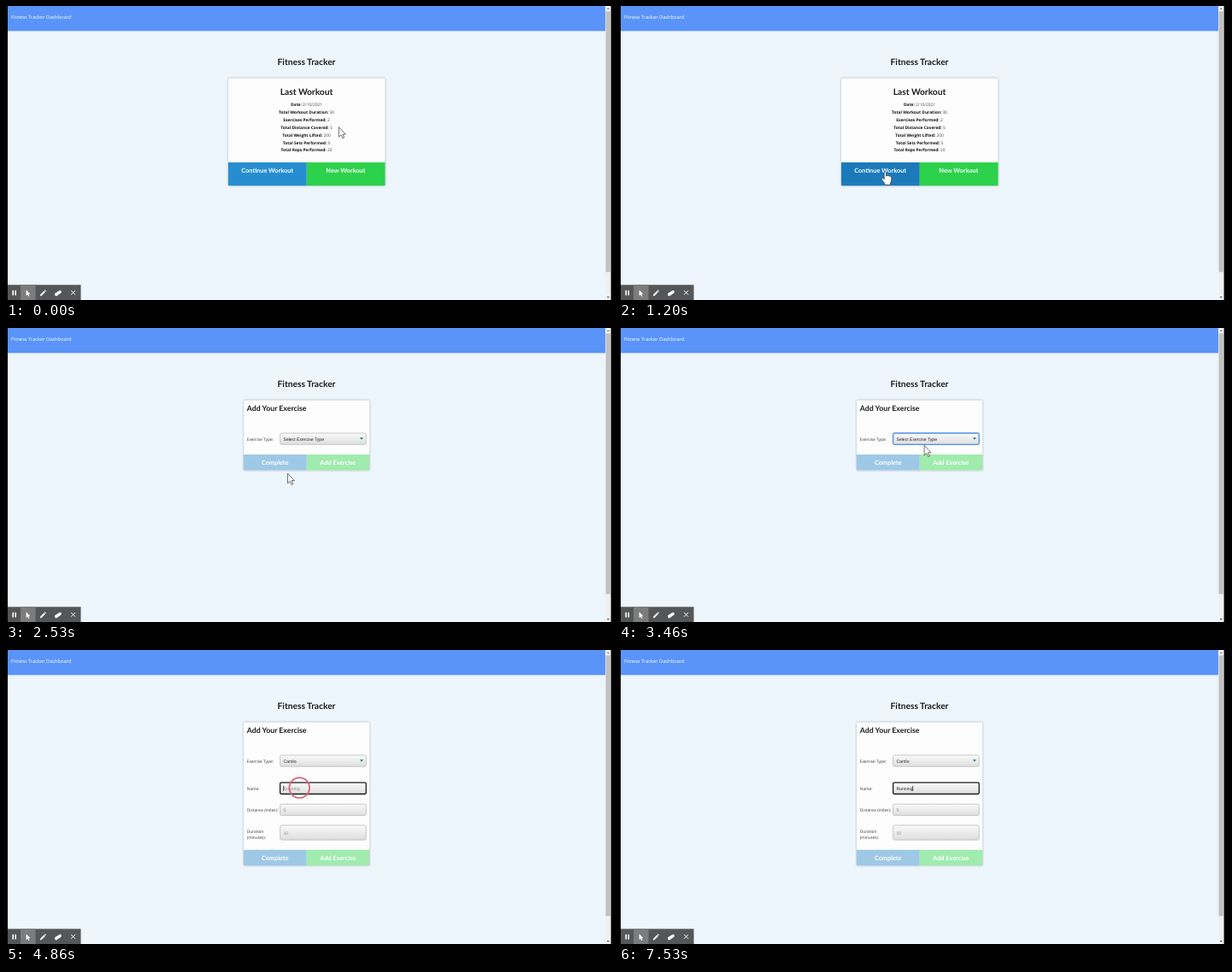
Recreate the animation shown at these times as an HTML page. Size 710 px wide and 344 px high, loop 8000 ms.

```html
<!DOCTYPE html>
<html lang="en">
<head>
<meta charset="utf-8">
<title>Fitness Tracker</title>
<style>
  html, body { margin: 0; width: 100%; height: 100%; overflow: hidden; background: #000; }
  svg { display: block; width: 710px; height: 344px; }
  text { font-family: "Open Sans", sans-serif; font-size: 4.77px; fill: #333; text-rendering: geometricPrecision; }
  .nav { font-size: 5.72px; fill: #fff; }
  .title, .subtitle, .button { font-family: Lato, sans-serif; font-weight: 700; fill: #1b1c1d; }
  .title { font-size: 10.2px; }
  .subtitle { font-size: 8.75px; }
  .button { font-size: 7.33px; fill: #fff; }
  .title, .button, .stat { text-anchor: middle; }
  .stat { font-size: 4.83px; fill: #444; }
  .stat tspan { font-weight: 700; fill: #111; }
  .input { font-family: "Liberation Sans", Arial, sans-serif; font-size: 5.1px; fill: #222; }
  .hint { fill: #8c8c8c; }
  .field { fill: url(#fieldFill); stroke: #b4b4b4; stroke-width: .7; }
  .card { fill: #fdfdfd; filter: drop-shadow(0 .6px 1px #0005); }
</style>
</head>
<body>
<svg viewBox="0 0 710 344">
  <defs>
    <linearGradient id="fieldFill" x2="0" y2="1">
      <stop stop-color="#fafafa"/><stop offset="1" stop-color="#dedede"/>
    </linearGradient>
  </defs>

  <rect x="2" width="699" height="344" fill="#edf5fd"/>
  <rect x="2" width="699" height="29.3" fill="#5a94f9"/>
  <text class="nav" x="6" y="15.3">Fitness Tracker Dashboard</text>
  <text class="title" x="351.5" y="69.3">Fitness Tracker</text>

  <g id="scrollbar">
    <rect x="701" width="6.6" height="344" fill="#f1f1f1"/>
    <rect x="701.6" y="6.3" width="5.2" height="305" fill="#c1c1c1"/>
    <path d="M702.8 4l1.5-1.7 1.5 1.7z" fill="#777"/>
    <path d="M702.8 340l1.5 1.7 1.5-1.7z" fill="#444"/>
  </g>

  <g id="summary">
    <rect class="card" x="260" y="84.5" width="183.5" height="125.7" rx="1.2"/>
    <text class="title" x="351.5" y="104">Last Workout</text>
    <g id="stats"></g>
    <path id="continue" d="M260 183h91.8v27.2h-90.8q-1 0-1-1z"/>
    <path d="M351.8 183h91.7v26.2q0 1-1 1h-90.7z" fill="#2cd24b"/>
    <text class="button" x="305.7" y="195">Continue Workout</text>
    <text class="button" x="397.3" y="195">New Workout</text>
  </g>

  <g id="exercise">
    <rect id="sheet" class="card" x="278" y="84.5" width="147.2" rx="1.2"/>
    <text class="subtitle" x="281.8" y="96.8">Add Your Exercise</text>
    <text x="281.8" y="131.7">Exercise Type:</text>
    <rect id="select" class="field" x="320.6" y="123" width="100.6" height="13.3" rx="1.8"/>
    <text id="type" class="input" x="324.5" y="131.5"></text>
    <path d="M413.8 128.2h4.2l-2.1 2.5z" fill="#187f8c"/>
    <g id="details">
      <text x="281.8" y="163.9">Name:</text>
      <text x="281.8" y="189">Distance (miles):</text>
      <text x="281.8" y="213.9">Duration</text>
      <text x="281.8" y="220.9">(minutes):</text>
      <rect id="name" class="field" x="320.6" y="155.2" width="100.6" height="13.3" rx="1.4"/>
      <rect class="field" x="320.6" y="180.3" width="100.6" height="13.3" rx="1.8"/>
      <rect class="field" x="320.6" y="205" width="100.6" height="17.2" rx="1.8"/>
      <text id="entry" class="input" x="324.5" y="163.8"></text>
      <text class="input hint" x="324.5" y="188.9">5</text>
      <text class="input hint" x="324.5" y="215.6">10</text>
      <rect id="caret" y="158.9" width=".7" height="6" fill="#111"/>
    </g>
    <g id="actions">
      <path d="M278 0h73.8v18.5h-72.8q-1 0-1-1z" fill="#9ec9e6"/>
      <path d="M351.8 0h73.4v17.5q0 1-1 1h-72.4z" fill="#a0ebae"/>
      <text class="button" x="314.7" y="12">Complete</text>
      <text class="button" x="388.2" y="12">Add Exercise</text>
    </g>
  </g>

  <g id="toolbar" fill="#fff">
    <rect x="2" y="326.3" width="85.5" height="17.7" fill="#555657"/>
    <rect x="17" y="326.3" width="17.5" height="17.7" fill="#7c7c7c"/>
    <path d="M7.4 332.8h1.6v5.6h-1.6zM10.4 332.8h1.6v5.6h-1.6z"/>
    <path d="M23.6 332.3v6.8l1.6-1.4 1.1 2.4 1.1-.5-1.1-2.4h2.2z"/>
    <path d="M39.8 339.4l.5-1.9 4.2-4.2 1.4 1.4-4.2 4.2zM45 332.8l.7-.7 1.4 1.4-.7.7z"/>
    <path d="M57.2 336.3l5.6-3.6 1.8.2v2.6l-5.6 3.9-1.8-.6z"/>
    <path d="M76.1 332.9l4.9 4.9m0-4.9l-4.9 4.9" stroke="#fff" stroke-width="1"/>
  </g>

  <g id="pointer" stroke="#333" stroke-width=".7" stroke-linejoin="round" fill="#fff">
    <path id="arrow" d="M.3 .3v11.6l2.7-2.4 1.9 4 1.7-.8-1.8-3.9h3.4z"/>
    <path id="hand" d="M-1.3 .9q0-1.1 1.1-1.1t1.2 1.1v4.3l.4-.8q1.5-.3 1.8.7.2-.5.9-.5.9 0 1.1.8.3-.3 1-.2 1.1.2 1 1.6v2.7q0 2-1.2 3.4v2.3H-.9v-1.6L-4 9.2Q-4.8 7.6-3.5 7.1q.7-.2 1.3.6l.9 1z"/>
  </g>
  <circle id="ring" r="11.8" fill="none" stroke="#d9607b" stroke-width="1.7"/>
</svg>

<script>
const LOOP = 8000;
const PAGE_CHANGE = 2000, SELECT_FOCUS = 3330, TYPE_CHOSEN = 4130, NAME_FOCUS = 4860;
const BLINK = 530;
const KEY_TIMES = [6460, 6660, 6860, 7000, 7200, 7330, 7530];
const STATS = [
  ["Date", "2/10/2021"], ["Total Workout Duration", 30], ["Exercises Performed", 2],
  ["Total Distance Covered", 5], ["Total Weight Lifted", 200],
  ["Total Sets Performed", 5], ["Total Reps Performed", 20]
];
// Pointer stops: time, x, y
const PATH = [
  [60, 389, 141.3], [900, 311.5, 194], [2400, 311.5, 194], [2530, 329.2, 169.8],
  [3260, 356.8, 137], [4129, 356.8, 137], [4130, 345, 149], [4330, 345, 149], [4600, 343, 161]
];
// Click rings: start, end, x, y
const CLICKS = [[1400, 1530, 311.5, 194], [3330, 3430, 356.8, 137], [4860, 5060, 343.2, 161.2]];

const el = Object.fromEntries([...document.querySelectorAll("[id]")].map(e => [e.id, e]));
const show = (node, on) => node.style.display = on ? "" : "none";

el.stats.innerHTML = STATS.map(([label, value], i) =>
  `<text class="stat" x="351.5" y="${117.4 + i * 8.84}"><tspan>${label}:</tspan> ${value}</text>`).join("");

function pointerAt(t) {
  const next = PATH.findIndex(stop => stop[0] > t);
  if (next === 0) return PATH[0].slice(1);
  if (next < 0) return PATH.at(-1).slice(1);
  const [t0, x0, y0] = PATH[next - 1], [t1, x1, y1] = PATH[next];
  const u = (t - t0) / (t1 - t0), ease = u * u * (3 - 2 * u);
  return [x0 + (x1 - x0) * ease, y0 + (y1 - y0) * ease];
}

function outline(field, color, width) {
  field.style.stroke = color;
  field.style.strokeWidth = width;
}

function drawForm(t) {
  const expanded = t >= TYPE_CHOSEN, naming = t >= NAME_FOCUS;
  const selecting = t >= SELECT_FOCUS && !naming;
  const typed = "Running".slice(0, KEY_TIMES.filter(k => t >= k).length);

  el.sheet.setAttribute("height", expanded ? 167.8 : 82);
  el.actions.setAttribute("transform", `translate(0 ${expanded ? 233.8 : 148})`);
  el.type.textContent = expanded ? "Cardio" : "Select Exercise Type";
  show(el.details, expanded);
  outline(el.select, selecting ? "#4d90e0" : "", selecting ? 1.3 : "");
  outline(el.name, naming ? "#1a1a1a" : "", naming ? 1.3 : "");

  el.entry.textContent = typed || "Running";
  el.entry.classList.toggle("hint", !typed);
  show(el.caret, naming && (typed || Math.floor((t - NAME_FOCUS) / BLINK) % 2 === 0));
  if (expanded) el.caret.setAttribute("x", 324.4 + (typed ? el.entry.getComputedTextLength() : 0));
}

function draw(t) {
  const onForm = t >= PAGE_CHANGE;
  const [x, y] = pointerAt(t);
  const hover = !onForm && y > 183;

  show(el.summary, !onForm);
  show(el.exercise, onForm);
  el.continue.setAttribute("fill", hover ? "#1c7aba" : "#268ed0");
  if (onForm) drawForm(t);

  el.pointer.setAttribute("transform", `translate(${x} ${y})`);
  show(el.arrow, !hover && !(t > 4330 && y > 155));
  show(el.hand, hover);

  const click = CLICKS.find(([start, end]) => t >= start && t < end);
  show(el.ring, click);
  if (click) el.ring.setAttribute("transform", `translate(${click[2]} ${click[3]})`);
}

const begin = performance.now();
function tick() {
  draw((performance.now() - begin) % LOOP);
  requestAnimationFrame(tick);
}
tick();
</script>
</body>
</html>
```
